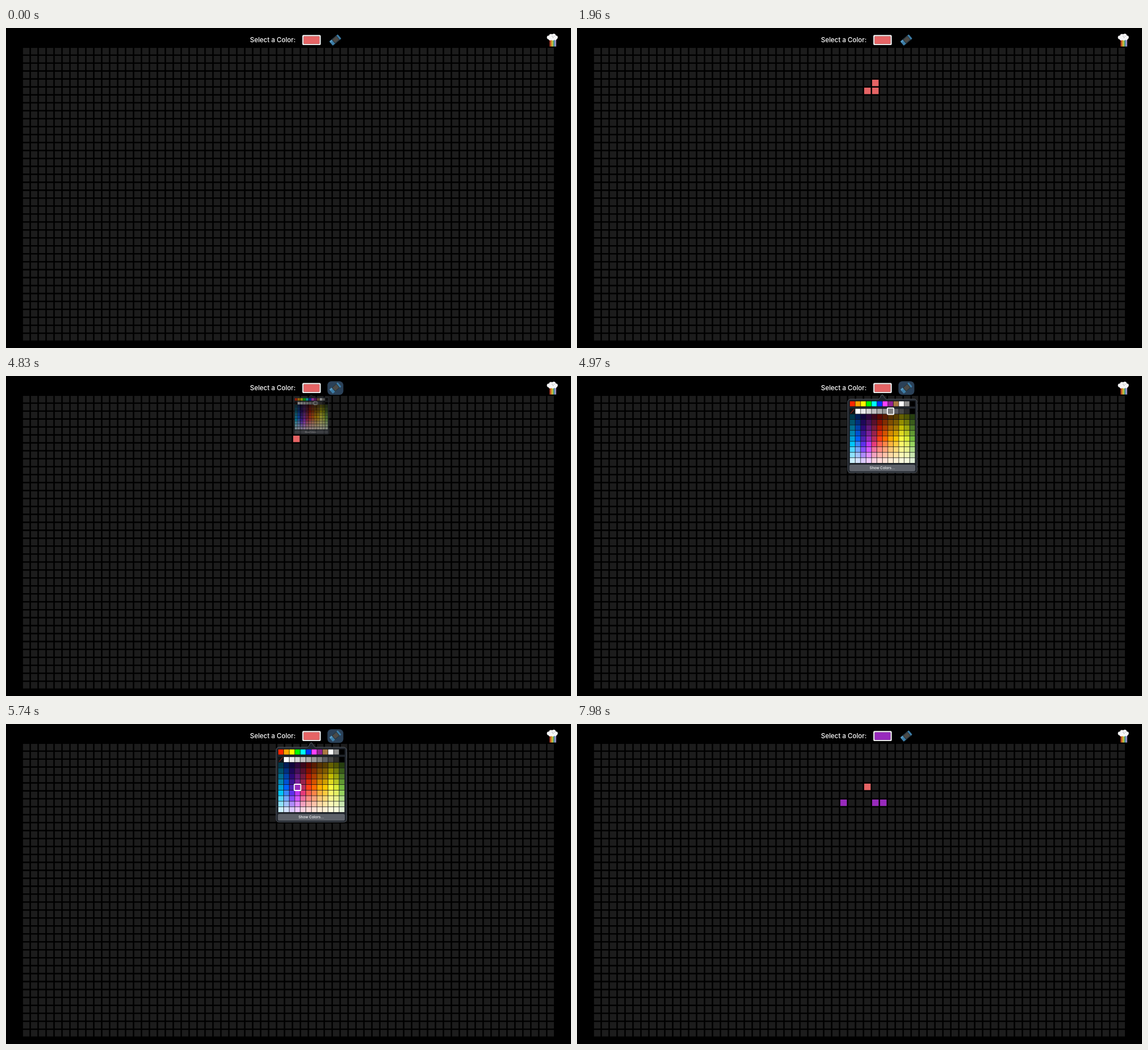
Write an HTML page that moves like this. It is 994 px wide and 563 px high and loops after 8 s.

```html
<!DOCTYPE html>
<html lang="en">
<head>
<meta charset="utf-8">
<title>Pixel board</title>
<style>
  html, body { margin: 0; width: 100%; height: 100%; overflow: hidden; background: #000; }
  svg { display: block; width: 994px; height: 563px; }
  text { font-family: Inter, Roboto, sans-serif; text-anchor: middle; }
</style>
</head>
<body>
<svg viewBox="0 0 994 563">
  <path id="board" stroke="#1c1c1c"/>
  <g id="paint"></g>

  <text x="469.4" y="25" font-size="11.5" font-weight="500" fill="#fff">Select a Color:</text>

  <rect x="521.3" y="12.3" width="32.5" height="17.8" rx="2.2" fill="#f2f2f2"/>
  <rect id="swatch" x="523.6" y="14.5" width="28" height="13.4" rx="1.2" stroke="#000" stroke-opacity=".3" stroke-width=".6"/>

  <rect id="active" x="565.5" y="9.3" width="28" height="24" rx="7" fill="#2b4158"/>
  <g transform="translate(579.4 21) rotate(-40)">
    <rect x="-10" y="-4.8" width="19.6" height="9.6" rx="1" fill="#3d7ea8"/>
    <rect x="-4.6" y="-5" width="11" height="10" fill="#24323c"/>
    <rect x="-3.6" y="-3.8" width="9" height="7.6" fill="#4b4a47"/>
    <rect x="-9.4" y="-4.2" width="4.4" height="2.4" fill="#5b9cc4"/>
  </g>

  <g id="rain"></g>
  <g fill="#f7f7f8">
    <circle cx="955" cy="16.6" r="3.4"/><circle cx="958.8" cy="13.8" r="3.4"/>
    <circle cx="963.7" cy="13.4" r="3.5"/><circle cx="967.6" cy="16.4" r="3.1"/>
    <circle cx="957.4" cy="18.9" r="2.9"/><circle cx="962" cy="18.6" r="3.4"/>
    <circle cx="966.2" cy="18.8" r="2.7"/>
  </g>
  <path d="M960.2 14.2h1.4M962.4 15.6v1.6M964.2 14.4h1" stroke="#77777c" stroke-width=".8"/>

  <g id="picker">
    <path d="M480 41H529.5C533 41 534.5 32.8 537 32.8S541 41 544.5 41H594.5A5 5 0 0 1 599.2 46V167.6A5 5 0 0 1 594.5 172.4H480A5 5 0 0 1 475.2 167.6V46A5 5 0 0 1 480 41Z"
      fill="#1f242b" stroke="#565c65"/>
    <g id="colors"></g>
    <path d="M480.4 66.4L487 58.6" stroke="#c0281c" stroke-width="1"/>
    <rect x="478.3" y="158.2" width="117.8" height="11.8" rx="2.6" fill="#5d6169"/>
    <text x="537" y="166.4" font-size="6.4" font-weight="600" fill="#e4e5e7">Show Colors...</text>
    <g id="mark">
      <rect x="-5.6" y="-5.6" width="11.2" height="11.2" rx=".8" fill="none" stroke="#fff" stroke-width="2"/>
    </g>
  </g>
</svg>
<script>
const $ = id => document.getElementById(id);
const LOOP = 8000, TICK = 70;
const RED = '#e66465', PURPLE = '#982abc';
const LEFT = 29.9, TOP = 35, PITCH = 13.98, SIZE = 11.4;

function rect(parent, x, y, w, h, fill) {
  const el = document.createElementNS('http://www.w3.org/2000/svg', 'rect');
  Object.entries({ x, y, width: w, height: h, fill }).forEach(([k, v]) => el.setAttribute(k, v));
  return parent.appendChild(el);
}

// Each board row is one thick dashed line.
let rows = '';
for (let r = 0; r < 37; r++) rows += `M${LEFT} ${TOP + SIZE / 2 + r * PITCH}h${66 * PITCH + SIZE}`;
$('board').setAttribute('d', rows);
$('board').setAttribute('stroke-width', SIZE);
$('board').setAttribute('stroke-dasharray', `${SIZE} ${PITCH - SIZE}`);

['#d8492f', '#f09a2c', '#f3df4c', '#79c06e', '#6da6d8', '#b9a3dd'].forEach((c, i) =>
  rect($('rain'), 956.4 + i * 1.95, 19, 1.7, 13.6, c));

// column, row, colour, painted from, until
const strokes = [
  [34, 5, RED, 1190, LOOP],
  [35, 5, RED, 1610, 3850],
  [35, 4, RED, 1820, 3360],
  [31, 7, PURPLE, 6580, LOOP],
  [35, 7, PURPLE, 7280, LOOP],
  [36, 7, PURPLE, 7840, LOOP]
].map(([c, r, color, from, until]) => ({
  el: rect($('paint'), LEFT + c * PITCH, TOP + r * PITCH, SIZE, SIZE, color), from, until
}));

const BASIC = 'ff2600 ffa500 fffb00 00f900 00fdff 0433ff ff40ff 942192 aa7942 ffffff 919191 000000';
const GREYS = '111315 ffffff ebebeb d6d6d6 c2c2c2 adadad 999999 808080 5c5e62 474747 2b2b2b 000000';
// Key shades by row; rows in between are the mean of their neighbours.
const SHADES = {
  2: '00374a 011d57 11053b 2e063d 3c071b 5c0701 5a1c00 583300 563d00 666100 4f5504 263e0f',
  4: '016e8f 0042a9 2c0977 61187c 791a3d b51a00 ad3e00 a96800 a67b01 c4bc00 9ba50e 4e7a27',
  6: '00a1d8 0061fd 4d22b2 982abc b92d5d ff4015 ff6a00 ffab01 fcc700 fefb41 d9ec37 76bb40',
  7: '01c7fc 3a87fd 5e30eb be38f3 e63b7a fe6250 fe8648 feb43f fecb3e fff76b e4ef65 96d35f',
  8: '52d6fc 74a7ff 864ffd d357fe ee719e ff8c82 ffa57d ffc777 ffd977 fff994 eaf28f b1dd8b',
  10: 'cbf0ff d3e2ff d9c9fe efcaff f9d3e0 ffdad8 ffe2d6 ffecd4 fff1d5 fefcdd f7fadb dfeed4'
};
const hexes = list => list.split(' ').map(h => '#' + h);
const channels = h => [1, 3, 5].map(i => parseInt(h.slice(i, i + 2), 16));
const mean = (a, b) => `rgb(${channels(a).map((v, i) => (v + channels(b)[i]) >> 1)})`;
function rowColors(r) {
  if (r < 2) return hexes(r ? GREYS : BASIC);
  if (SHADES[r]) return hexes(SHADES[r]);
  const next = hexes(SHADES[r + 1]);
  return hexes(SHADES[r - 1]).map((h, i) => mean(h, next[i]));
}
const colX = c => 483.6 + c * 9.76;
const rowY = r => r ? 62.6 + (r - 1) * 9.78 : 49.2;

rect($('colors'), 478.5, 44.1, 117.5, 10.2, '#101215');
rect($('colors'), 478.5, 57.5, 117.5, 98.2, '#101215');
for (let r = 0; r <= 10; r++)
  rowColors(r).forEach((color, c) => rect($('colors'), colX(c) - 4.5, rowY(r) - 4.5, 9, 9, color));

const OPEN = 4830, PICK = 6020, CLOSED = 6160;
const popScale = [.5, .85, .983, 1.015, 1];
const popAlpha = [.5, .9, 1];
const closeAlpha = [.6, .25];
const markPath = [[4970, 7, 1], [5390, 10, 10], [5460, 10, 10], [5740, 3, 6]];

function markCell(t) {
  if (t <= markPath[0][0]) return markPath[0].slice(1);
  const i = markPath.findIndex(p => p[0] > t);
  if (i < 0) return markPath.at(-1).slice(1);
  const [a, b] = [markPath[i - 1], markPath[i]];
  const k = (t - a[0]) / (b[0] - a[0]);
  return [1, 2].map(j => Math.round(a[j] + (b[j] - a[j]) * k));
}

const show = (el, on) => { el.style.display = on ? '' : 'none'; };

function draw(t) {
  strokes.forEach(s => show(s.el, t >= s.from && t < s.until));
  $('swatch').setAttribute('fill', t < PICK ? RED : PURPLE);
  show($('active'), t >= 2730 && t < PICK);
  const open = t >= OPEN && t < CLOSED;
  show($('picker'), open);
  if (!open) return;
  const step = (t - OPEN) / TICK;
  const scale = popScale[step] ?? 1;
  const alpha = t < PICK ? popAlpha[step] ?? 1 : closeAlpha[(t - PICK) / TICK];
  const [c, r] = markCell(t);
  $('picker').setAttribute('transform', `translate(537 33) scale(${scale}) translate(-537 -33)`);
  $('picker').setAttribute('opacity', alpha);
  $('mark').setAttribute('transform', `translate(${colX(c)} ${rowY(r)})`);
}

const start = performance.now();
function frame() {
  const t = (performance.now() - start) % LOOP;
  draw(Math.floor(t / TICK) * TICK);
  requestAnimationFrame(frame);
}
frame();
</script>
</body>
</html>
```
